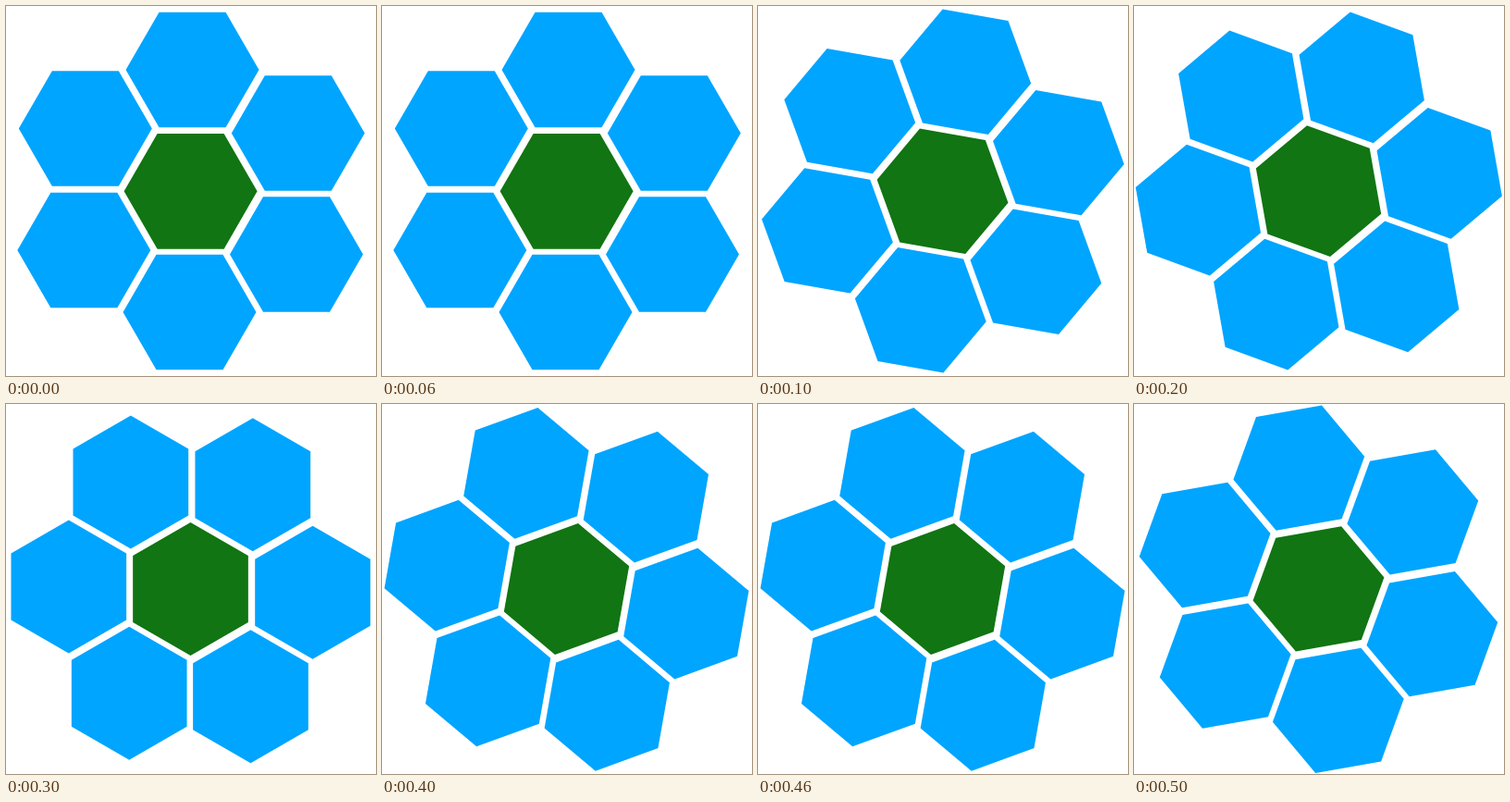
Animation of 400x400 px, one loop 0.6 s. Source, as an HTML page:

```html
<!DOCTYPE html>
<html lang="en">
<head>
<meta charset="utf-8">
<title>Turning hexagons</title>
<style>
  html, body { margin: 0; width: 100%; height: 100%; overflow: hidden; background: #fff; }
  svg { display: block; width: 100vw; height: 100vh; }
</style>
</head>
<body>
<svg viewBox="-200 -200 400 400"><g id="flower"></g></svg>
<script>
  const RADIUS = 72, LOOP = 600, STEP = 100, TURN = 10;
  const BLUE = '#00a5ff', GREEN = '#107512';
  const petals = [[1.5, -131], [115.8, -62.5], [114, 68.5], [-1.5, 131], [-115.7, 64], [-114.2, -67.5]];
  const flower = document.getElementById('flower');

  function addHexagon(x, y, color) {
    const points = Array.from({ length: 6 }, (_, i) => {
      const a = i * Math.PI / 3;
      return [x + RADIUS * Math.cos(a), y + RADIUS * Math.sin(a)];
    });
    const hex = document.createElementNS('http://www.w3.org/2000/svg', 'polygon');
    hex.setAttribute('points', points.join(' '));
    hex.setAttribute('fill', color);
    flower.append(hex);
  }

  petals.forEach(([x, y]) => addHexagon(x, y, BLUE));
  addHexagon(-0.4, 0.3, GREEN);

  // The flower turns in hard steps; after 60 degrees it starts over.
  const start = performance.now();
  function draw(now) {
    const t = Math.max(0, now - start) % LOOP;
    flower.setAttribute('transform', `rotate(${Math.floor(t / STEP) * TURN})`);
    requestAnimationFrame(draw);
  }
  draw(start);
</script>
</body>
</html>
```
